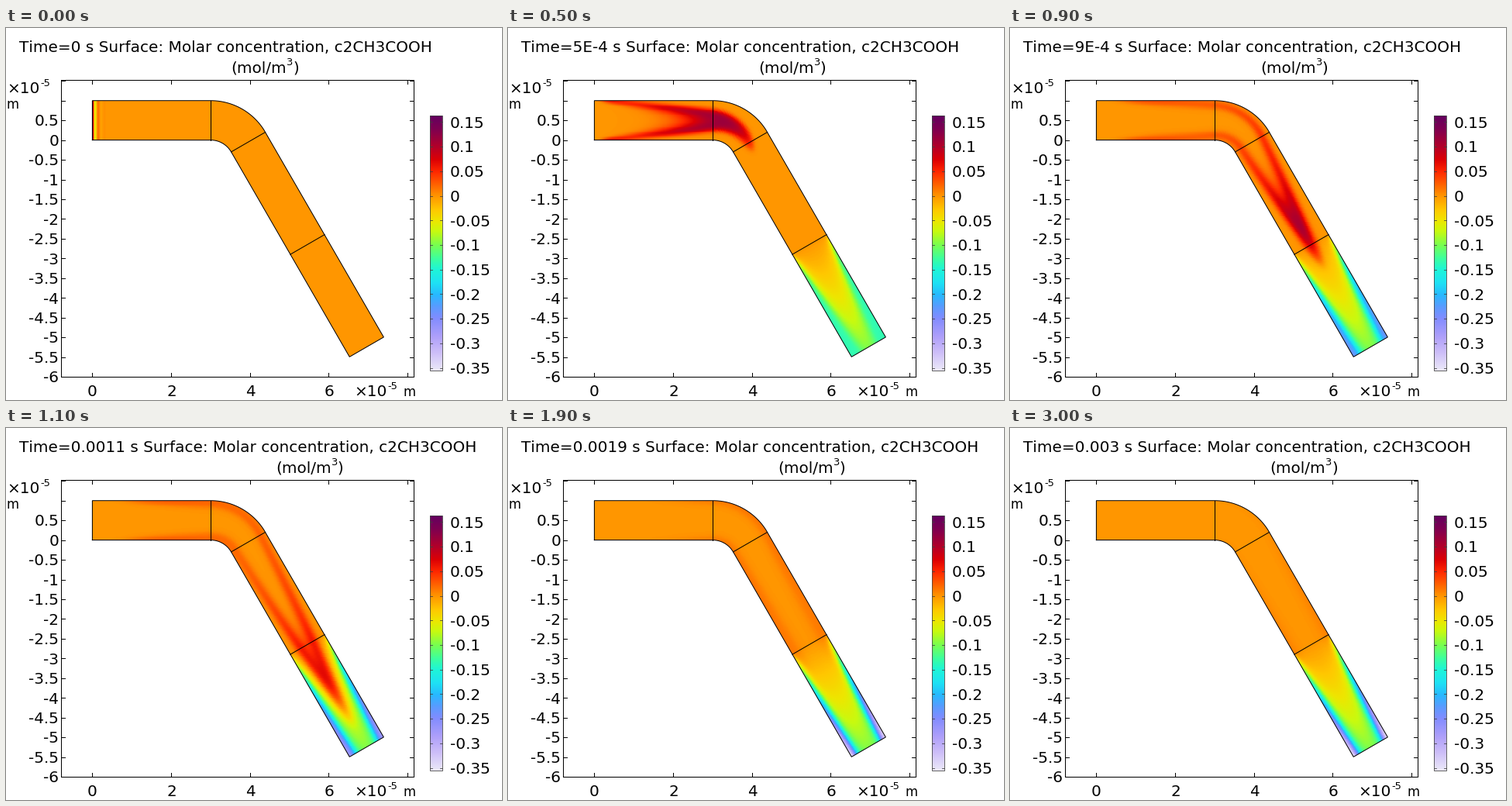
Animation of 640 by 480 pixels, one loop 3100 ms. Source, as a matplotlib script:

```python
import numpy as np
import matplotlib.pyplot as plt
from matplotlib.animation import FuncAnimation
from matplotlib.colors import LinearSegmentedColormap

plt.rcParams["font.family"] = "DejaVu Sans"
plt.rcParams["text.kerning_factor"] = 6

W, H, DPI = 640, 480, 80
PX = 72 / DPI                        # points per pixel
FRAMES, INTERVAL = 31, 100

# Channel geometry, in units of 1e-5 m
X0, Y0, UNIT = 111.4, 144.6, 50.9    # pixel origin and scale
LEG, R_IN, R_MID = 3.0, 0.6, 1.1
TURN = np.pi / 3
BEND_END = LEG + R_MID * TURN
REACT = BEND_END + LEG               # the reaction starts here
LENGTH = REACT + LEG

# Transport, with one frame as the unit of time
V_MAX, DIFF, RATE = 0.87, 1.2e-3, 0.027
PULSE, PULSE_AT, PULSE_W = 0.118, 1.25, 1.25
ROWS, STEP, SUBSTEPS = 60, 0.02, 10

# Colour scale
LOW, HIGH = -0.3555, 0.1634
SCALE = [
    (-0.3555, "#ebe8f8"), (-0.32, "#cdbef8"), (-0.288, "#afa0fa"),
    (-0.25, "#828cff"), (-0.226, "#5a9bff"), (-0.202, "#28b9ff"),
    (-0.178, "#1ee1f5"), (-0.15, "#1ef5d7"), (-0.128, "#3cffa0"),
    (-0.1, "#78ff50"), (-0.072, "#c8fa0f"), (-0.05, "#eee600"),
    (-0.028, "#ffc800"), (0.0, "#ff9600"), (0.05, "#ff2800"),
    (0.075, "#dc0005"), (0.1, "#b40028"), (0.136, "#800050"),
    (HIGH, "#64005f"),
]
CMAP = LinearSegmentedColormap.from_list(
    "prism", [((v - LOW) / (HIGH - LOW), c) for v, c in SCALE], N=512)


def colour(c):
    return CMAP(np.clip((c - LOW) / (HIGH - LOW), 0, 1))


def to_px(x, y):
    return X0 + UNIT * np.asarray(x), Y0 - UNIT * np.asarray(y)


def place(xi, n):
    """Channel coordinates (along, across) to plot units."""
    xi, n = np.broadcast_arrays(np.asarray(xi, float), np.asarray(n, float))
    th = np.clip((xi - LEG) / R_MID, 0, TURN)
    run = np.minimum(xi, LEG) - LEG + np.maximum(xi - BEND_END, 0)
    r = R_IN + n
    return (LEG + r * np.sin(th) + run * np.cos(th),
            -R_IN + r * np.cos(th) - run * np.sin(th))


def pixel_lookup():
    """For every pixel: inside the channel or not, and its grid cell."""
    px, py = np.meshgrid(np.arange(W) + 0.5, np.arange(H) + 0.5)
    dx, dy = (px - X0) / UNIT - LEG, (Y0 - py) / UNIT + R_IN
    th = np.arctan2(dx, dy)
    along = dx * np.cos(TURN) - dy * np.sin(TURN)
    first, last = dx <= 0, (dx > 0) & (along >= 0)
    xi = np.where(first, dx + LEG,
                  np.where(last, BEND_END + along, LEG + R_MID * th))
    r = np.where(first, dy,
                 np.where(last, dx * np.sin(TURN) + dy * np.cos(TURN),
                          np.hypot(dx, dy)))
    n = r - R_IN
    inside = (xi >= 0) & (xi <= LENGTH) & (n >= 0) & (n <= 1)
    row = np.clip((n * ROWS).astype(int), 0, ROWS - 1)
    col = np.clip(np.rint(xi / STEP).astype(int), 0, COLS - 1)
    return inside, row[inside], col[inside]


def simulate():
    """Pulse carried by a parabolic flow, spreading across the channel."""
    dt = 1 / SUBSTEPS
    speed = V_MAX * 4 * n_grid * (1 - n_grid)
    arc = np.clip(xi_grid - LEG, 0, R_MID * TURN)
    path = xi_grid + np.outer((R_IN + n_grid) / R_MID - 1, arc)
    lap = np.eye(ROWS, k=1) + np.eye(ROWS, k=-1)
    lap -= np.diag(lap.sum(axis=1))
    spread = np.linalg.inv(np.eye(ROWS) - DIFF * dt * ROWS**2 * lap)
    sink = RATE * dt * (xi_grid > REACT)

    ripple = 0.16 * np.exp(-xi_grid / 0.07) * np.cos(2 * np.pi * xi_grid / 0.16)
    fields = [np.tile(ripple, (ROWS, 1))]
    c = np.zeros((ROWS, COLS))
    for i in range(1, (FRAMES - 1) * SUBSTEPS + 1):
        c[:, 0] = PULSE * np.exp(-((i * dt - PULSE_AT) / PULSE_W) ** 2)
        c = np.array([np.interp(p - v * dt, p, row)
                      for p, v, row in zip(path, speed, c)])
        c = spread @ c - sink
        if i % SUBSTEPS == 0:
            fields.append(c.copy())
    return fields


COLS = int(LENGTH / STEP) + 2
xi_grid = np.arange(COLS) * STEP
n_grid = (np.arange(ROWS) + 0.5) / ROWS
inside, cell_row, cell_col = pixel_lookup()
fields = simulate()

fig = plt.figure(figsize=(W / DPI, H / DPI), dpi=DPI, facecolor="white")
ax = fig.add_axes([0, 0, 1, 1])
ax.axis("off")


def put(x, y, s, size=20, ha="left"):
    return ax.text(x, y, s, fontsize=size * PX, ha=ha, va="baseline")


def line(x, y, color="black", width=1.0, **kw):
    ax.plot(x, y, color=color, lw=width * PX, **kw)


canvas = np.zeros((H, W, 4))
image = ax.imshow(canvas, extent=(0, W, H, 0), interpolation="nearest",
                  aspect="auto", zorder=1)

# Channel outline and inner borders
ends = np.linspace(0, LENGTH, 600)
outline = [np.concatenate(p) for p in zip(place(ends, 0), place(ends[::-1], 1))]
outline = [np.append(p, p[0]) for p in outline]
line(*to_px(*outline), solid_joinstyle="miter")
for xi in (LEG, BEND_END, REACT):
    line(*to_px(*place(xi, [0, 1])))

# Plot frame, ticks and labels
L, R, T, B = 71, 526, 67, 450
line([L, R, R, L, L], [T, T, B, B, T], snap=True)
for v in range(0, 9, 2):
    x = np.floor(X0 + UNIT * v)
    for a, b in ((T, T + 5), (B, B - 5)):
        line([x, x], [a, b], snap=True)
    if v < 8:
        put(x + 0.5, 475, str(v), ha="center")
for k in range(-12, 4):
    v = k / 2
    y = Y0 - UNIT * v
    for a, b in ((L, L + 5), (R, R - 5)):
        line([a, b], [y, y], snap=True)
    if k < 2:
        put(68.3, y + 7.3, f"{v:g}", ha="right")

# Axis multipliers
for x, y, xm, ym in ((1.5, 84, 1, 104), (449.5, 475, 512, 475)):
    put(x, y, "×10")
    put(x + 43, y - 9, "-5", 13)
    put(xm, ym, "m", 16.5)

# Colour bar
BAR = (547, 563, 442, 113)
ax.imshow(colour(np.linspace(LOW, HIGH, 329))[:, None], extent=BAR,
          origin="lower", interpolation="nearest", aspect="auto", zorder=1)
bl, br, bb, bt = BAR
line([bl, br, br, bl, bl], [bt, bt, bb, bb, bt], "0.25", 0.8)
for k in range(-7, 4):
    v = k * 0.05
    y = bb - (v - LOW) / (HIGH - LOW) * (bb - bt)
    for a, b in ((bl, bl + 3), (br, br - 3)):
        line([a, b], [y, y], "0.25", 0.8)
    put(572.5, y + 7.3, f"{v:.2g}")

# Title in two lines; the second keeps its distance from the end of the first
title = put(17, 31, "")
unit_parts = [(290.5, put(0, 57, "(mol/m")), (361.5, put(0, 48.5, "3", 13)),
              (370, put(0, 57, ")"))]
ADVANCE = {".": 0.318, "E": 0.632, "-": 0.361}

ax.set_xlim(0, W)
ax.set_ylim(H, 0)


def time_label(k):
    return f"{k}E-4" if 0 < k < 10 else f"{k / 1e4:g}"


def draw(k):
    label = time_label(k)
    title.set_text(f"Time={label} s Surface: Molar concentration, c2CH3COOH")
    shift = 20.2 * sum(ADVANCE.get(ch, 0.636) for ch in label[1:])
    for x, part in unit_parts:
        part.set_x(x + shift)
    canvas[inside] = colour(fields[k][cell_row, cell_col])
    image.set_data(canvas)
    return [image, title, *(part for _, part in unit_parts)]


anim = FuncAnimation(fig, draw, frames=FRAMES, interval=INTERVAL, repeat=True)
plt.show()
```
